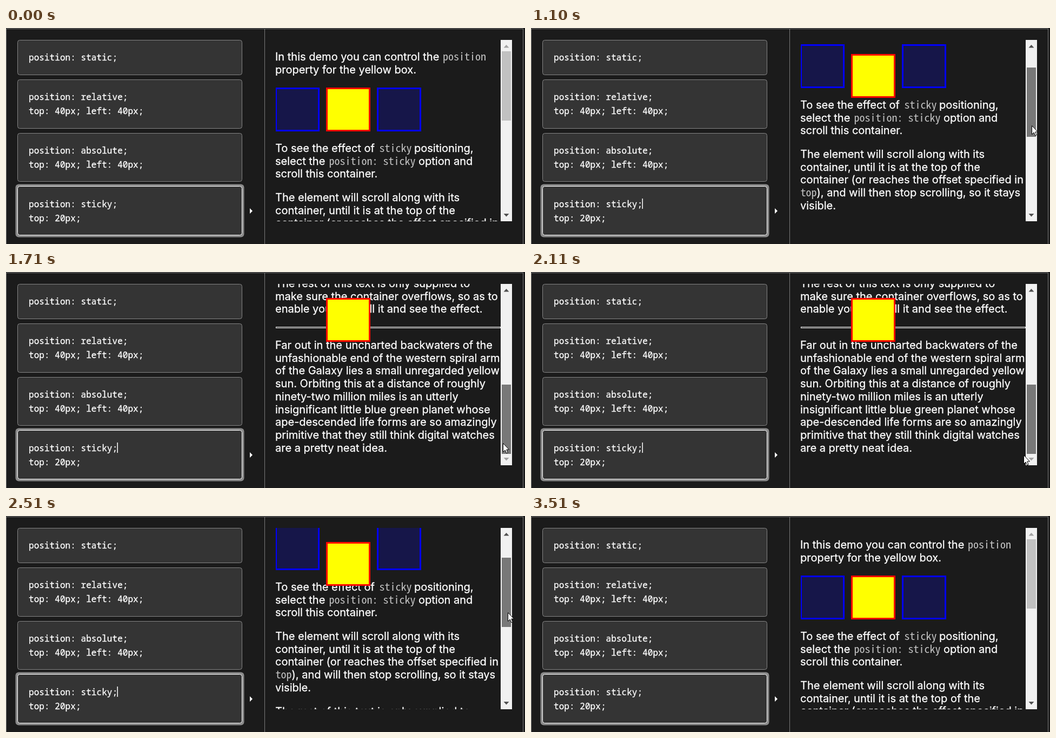
An HTML page that plays this animation: 960 by 399 pixels, repeating every 3800 ms.

```html
<!DOCTYPE html>
<html lang="en">
<head>
<meta charset="utf-8">
<title>Sticky positioning demo</title>
<style>
  html, body { margin: 0; height: 100%; overflow: hidden; background: #1b1b1b; }
  #stage { display: block; width: 100vw; height: 100vh; }
  text { fill: #fff; stroke: #fff; stroke-width: .3; white-space: pre; }
  .code { font: 16.1px "Noto Sans Mono", monospace; }
  .body { font: 20px Inter, sans-serif; font-optical-sizing: none; }
  .term { font-family: "Noto Sans Mono CJK KR", "Noto Sans Mono CJK JP", "Liberation Mono", monospace; font-weight: 300; fill: #c4c4c4; stroke: none; }
  .choice { fill: #343434; stroke: #858585; }
  .blue { fill: #161649; stroke: #00f; stroke-width: 3; }
</style>
</head>
<body>
<svg id="stage" viewBox="0 0 960 399">
  <path d="M0 1.5H957M.5 1V399M478.5 1V399M956.5 1V399" stroke="#7a7a7a" fill="none"/>
  <g id="choices">
    <rect x="17.5" y="288.5" width="423" height="98" rx="6" fill="#8a8a8a"/>
  </g>
  <path d="M451 333L456 338L451 343Z" fill="#fff"/>
  <rect id="caret" x="205.5" y="315" width="1.5" height="19" fill="#fff"/>

  <svg x="499" y="22" width="416" height="335" viewBox="499 22 416 335">
    <g id="content">
      <rect class="blue" x="499.5" y="111.5" width="79" height="78"/>
      <rect class="blue" x="687.5" y="111.5" width="79" height="78"/>
      <rect x="499.5" y="532.5" width="415" height="2" fill="none" stroke="#e6e6e6"/>
    </g>
    <rect id="sticky" x="593.5" width="79" height="78" fill="#ff0" stroke="red" stroke-width="3"/>
  </svg>

  <rect x="915" y="22" width="21" height="335" fill="#f1f1f1"/>
  <path id="up" d="M920.5 36.5L925.5 31L930.5 36.5Z"/>
  <path id="down" d="M920.5 343L925.5 348.5L930.5 343Z"/>
  <rect id="thumb" x="917" width="17" height="128"/>
  <path id="cursor" d="M.5 .5V16.5L4.2 13L6.8 18.8L9.2 17.8L6.8 12H11.5Z" fill="#fff" stroke="#000"/>
</svg>
<script>
const $ = id => document.getElementById(id);
const MAX_SCROLL = 431, THUMB_TRAVEL = 165, LOOP = 3800;
const LINE_HEIGHT = 23.75;

function add(parent, tag, attrs, content = '') {
  const el = document.createElementNS('http://www.w3.org/2000/svg', tag);
  for (const name in attrs) el.setAttribute(name, attrs[name]);
  el.textContent = content;
  parent.append(el);
  return el;
}

// Left column: one card per position value
[
  [22, 64, 'position: static;'],
  [95, 90, 'position: relative;', 'top: 40px; left: 40px;'],
  [194, 89, 'position: absolute;', 'top: 40px; left: 40px;'],
  [292, 90, 'position: sticky;', 'top: 20px;']
].forEach(([y, height, ...lines], i) => {
  const card = add($('choices'), 'rect', { class: 'choice', x: 21.5, y: y + .5, width: 415, height, rx: 4 });
  if (i === 3) card.style.stroke = '#fff';
  lines.forEach((line, n) =>
    add($('choices'), 'text', { class: 'code', x: 42, y: y + 38 + n * 26 + (i === 3) }, line));
});

// Right column: paragraphs as [first baseline, ...lines], baselines on whole pixels
[
  [60, 'In this demo you can control the', 'property for the yellow box.'],
  [229, 'To see the effect of', 'select the', 'scroll this container.'],
  [320, 'The element will scroll along with its', 'container, until it is at the top of the',
    'container (or reaches the offset specified in', '', 'visible.'],
  [459, 'The rest of this text is only supplied to', 'make sure the container overflows, so as to',
    'enable you to scroll it and see the effect.'],
  [573, 'Far out in the uncharted backwaters of the', 'unfashionable end of the western spiral arm',
    'of the Galaxy lies a small unregarded yellow', 'sun. Orbiting this at a distance of roughly',
    'ninety-two million miles is an utterly', 'insignificant little blue green planet whose',
    'ape-descended life forms are so amazingly', 'primitive that they still think digital watches',
    'are a pretty neat idea.']
].forEach(([top, ...lines]) => lines.forEach((line, n) =>
  add($('content'), 'text', { class: 'body', x: 498, y: Math.round(top + n * LINE_HEIGHT - .1) }, line)));

// Inline code terms, with the text that follows each one
const terms = [
  [808, 60, 'position'],
  [690.5, 229, 'sticky', 755, 'positioning,'],
  [597.5, 253, 'position: sticky', 763, 'option and'],
  [498.5, 391, 'top', 528.5, '), and will then stop scrolling, so it stays']
].map(([x, y, term, restX, rest]) => {
  if (rest) add($('content'), 'text', { class: 'body', x: restX, y }, rest);
  return add($('content'), 'text', { class: 'term', x, y }, term);
});

// Pick the font size that gives a 10px advance in whichever monospace is present
const pen = document.createElement('canvas').getContext('2d');
pen.font = '300 100px ' + getComputedStyle(terms[0]).fontFamily;
const termSize = 1000 / pen.measureText('0').width;
terms.forEach(el => el.style.fontSize = termSize + 'px');

// Pointer path: [step, x, y, scroll]
const keys = [
  [2, 788, 354, 0], [3, 812, 322, 0], [5, 884, 218, 0], [6, 914, 172, 0], [7, 929, 152, 0],
  [9, 930, 150, 0], [10, 929, 156, 16], [11, 926, 180, 80], [13, 922, 226, 201],
  [15, 922, 270, 321], [17, 919, 316, 431], [19, 913, 349, 431], [20, 910, 357, 431],
  [21, 911, 338, 431], [22, 916, 302, 400], [23, 921, 262, 305], [25, 928, 178, 91],
  [26, 929, 152, 12], [27, 929, 138, 0], [28, 928, 136, 0], [30, 924, 152, 0],
  [31, 921, 170, 0], [32, 905, 225, 0], [34, 850, 380, 0], [35, 840, 400, 0]
];

function pose(step) {
  const i = keys.findIndex(key => key[0] >= step);
  if (i < 0) return keys.at(-1);
  const b = keys[i], a = keys[i - 1] || b;
  const f = a === b ? 0 : (step - a[0]) / (b[0] - a[0]);
  return a.map((v, n) => v + (b[n] - v) * f);
}

function draw(now) {
  const t = now % LOOP;
  const step = t < 1210 ? Math.min(11, Math.floor(t / 100)) : Math.floor((t - 10) / 100);
  const [, x, y, rawScroll] = pose(step);
  const scroll = Math.round(rawScroll);
  const visible = step >= 2 && step < 35;
  const dragging = step >= 10 && step < 29;

  $('content').setAttribute('transform', `translate(0 ${-scroll})`);
  $('sticky').setAttribute('y', Math.max(110 - scroll, 48) + 1.5);
  $('thumb').setAttribute('y', 43 + Math.floor(THUMB_TRAVEL * scroll / MAX_SCROLL));
  $('thumb').setAttribute('fill', dragging ? '#787878' : visible && x >= 917 ? '#a8a8a8' : '#c1c1c1');
  $('up').setAttribute('fill', scroll > 0 ? '#505050' : '#a3a3a3');
  $('down').setAttribute('fill', scroll < MAX_SCROLL ? '#505050' : '#a3a3a3');
  $('cursor').setAttribute('transform', `translate(${Math.round(x)} ${Math.round(y)})`);
  $('cursor').setAttribute('visibility', visible ? 'visible' : 'hidden');
  $('caret').setAttribute('visibility', step >= 8 && step < 33 ? 'visible' : 'hidden');
}

const start = performance.now();
function tick() {
  draw(performance.now() - start);
  requestAnimationFrame(tick);
}
tick();
</script>
</body>
</html>
```
